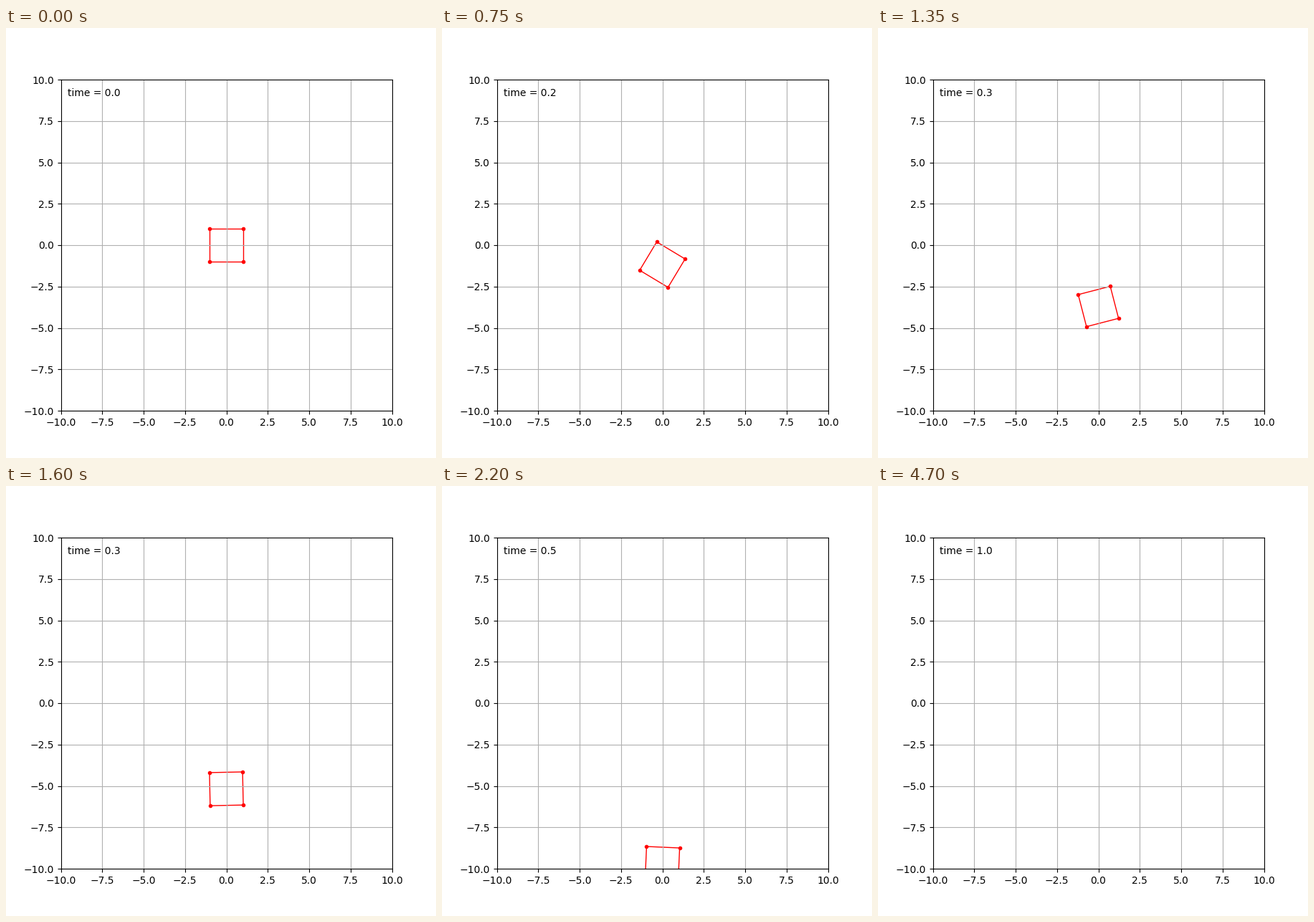
Recreate the animation shown at these times as a matplotlib script. Size 600 by 600 pixels, loop 5 s.

```python
import numpy as np
import matplotlib.pyplot as plt
from matplotlib.animation import FuncAnimation
from matplotlib.patches import Polygon

FRAMES = 100
INTERVAL = 50
DT = 0.01
PULL = 98.0      # downward force per unit mass, acting on one corner
INERTIA = 2.0    # per unit mass, four equal masses at the corners

CORNERS = np.array([[1, 1], [-1, 1], [-1, -1], [1, -1]], float)
PULLED = 3


def rotated(angle):
    c, s = np.cos(angle), np.sin(angle)
    return CORNERS @ np.array([[c, s], [-s, c]])


def simulate():
    """Explicit Euler steps of a square pulled down by one corner."""
    t = y = vy = angle = spin = 0.0
    states = []
    for _ in range(FRAMES):
        arm = rotated(angle)[PULLED, 0]
        y, angle = y + vy * DT, angle + spin * DT
        vy -= PULL * DT
        spin -= PULL * arm / INERTIA * DT
        t += DT
        states.append((t, y, angle))
    return states


STATES = simulate()

fig, ax = plt.subplots(figsize=(6, 6), dpi=100)
ax.set_aspect("equal")
ax.set_xlim(-10, 10)
ax.set_ylim(-10, 10)
ax.grid()

square = ax.add_patch(Polygon(CORNERS, closed=True, fill=False, ec="red", lw=1))
dots, = ax.plot([], [], "r.", ms=6)
label = ax.text(0.02, 0.95, "", transform=ax.transAxes)


def update(i):
    t, y, angle = STATES[i]
    points = rotated(angle) + [0, y]
    square.set_xy(points)
    dots.set_data(points[:, 0], points[:, 1])
    label.set_text(f"time = {t:.1f}")
    return square, dots, label


anim = FuncAnimation(fig, update, frames=FRAMES, interval=INTERVAL,
                     init_func=lambda: update(0), repeat=True, repeat_delay=0)
plt.show()
```
